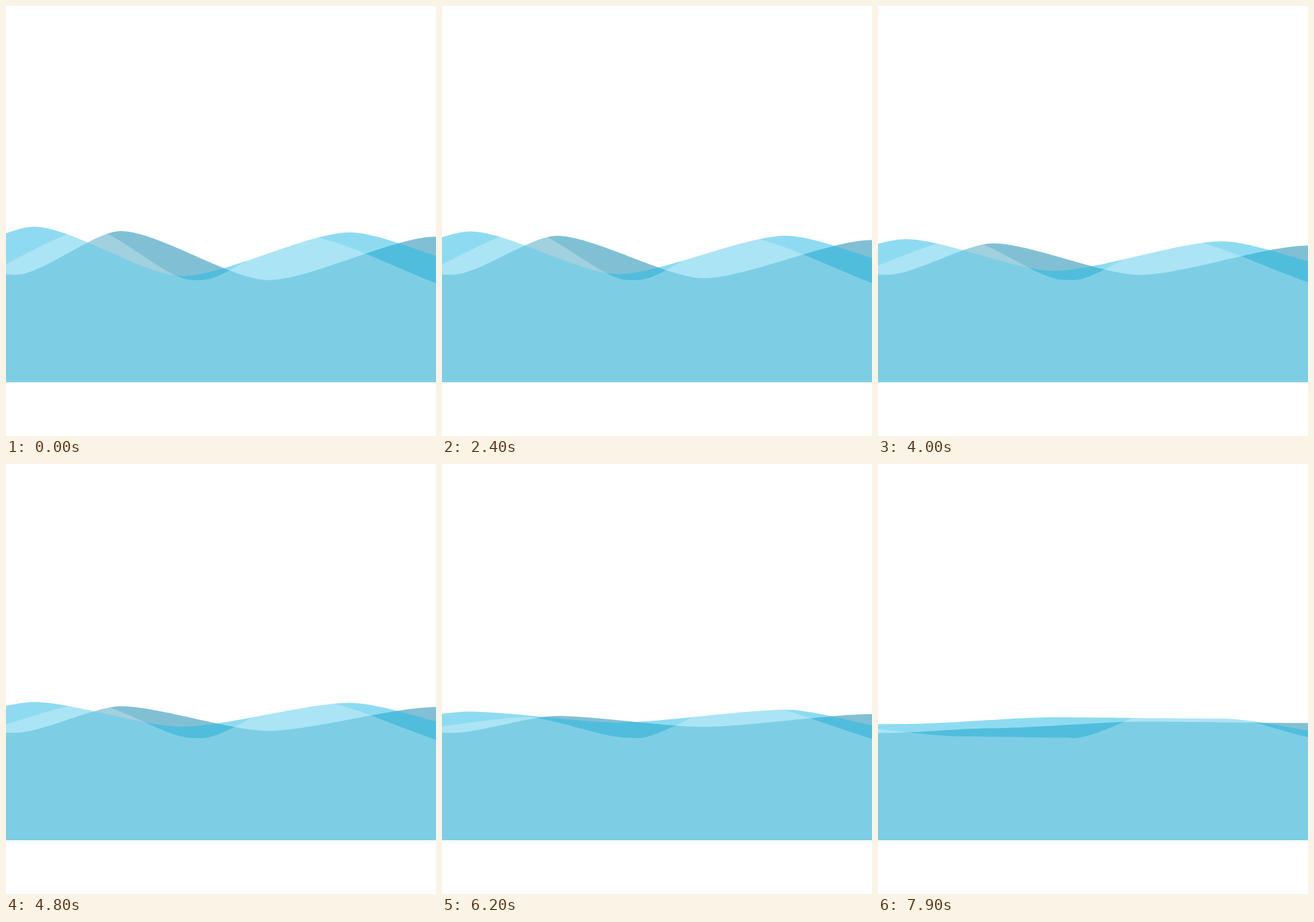
An HTML page that plays this animation: 640 px wide and 640 px high, repeating every 8 s.

```html
<!DOCTYPE html>
<html lang="en">
<head>
<meta charset="utf-8">
<title>Waves</title>
<style>
  html, body { margin: 0; width: 100%; height: 100%; overflow: hidden; background: #fff; }
  svg { display: block; width: 100%; height: 100%; }
</style>
</head>
<body>
<svg viewBox="0 0 640 640">
  <path id="back" fill="rgb(5,129,169)" fill-opacity=".5"/>
  <path id="middle" fill="rgb(40,187,229)" fill-opacity=".52"/>
  <path id="front" fill="#fff" fill-opacity=".25"/>
</svg>
<script>
const LOOP = 8000, STEP = 100, FLOOR = 560;
const TENSION = 0.25; // length of the level handles, as a share of the span

// Crests and troughs: x, first y, last y
const waves = [
  { id: 'back', delay: 0, rate: 0.000113, turns: [
    [-150, 380, 397], [15, 400, 400.3], [171, 335, 393.3], [390, 408, 383.5], [640, 343.3, 385.5]
  ] },
  { id: 'middle', delay: 0, rate: 0.000113, turns: [
    [-160, 402, 389], [42, 328.5, 387], [262, 402, 377], [512, 337, 379], [730, 394, 408]
  ] },
  { id: 'front', delay: 1400, rate: 0.00013, turns: [
    [-85, 415, 388], [126, 332.3, 405.5], [277, 408, 407.3], [291, 408, 408],
    [440, 342, 360], [715, 431, 419]
  ] }
];

function progress(time, { delay, rate }) {
  const swing = t => Math.sin(rate * Math.max(0, t - delay)) ** 2;
  return swing(time) / swing(LOOP - STEP);
}

function wavePath({ turns }, p) {
  const points = turns.map(([x, from, to]) => [x, from + (to - from) * p]);
  let [x, y] = points[0];
  let d = `M${x} ${FLOOR}V${y}`;
  for (const [nextX, nextY] of points.slice(1)) {
    const handle = TENSION * (nextX - x);
    d += `C${[x + handle, y, nextX - handle, nextY, nextX, nextY]}`;
    [x, y] = [nextX, nextY];
  }
  return `${d}V${FLOOR}Z`;
}

function draw(time) {
  for (const wave of waves) {
    document.getElementById(wave.id)
      .setAttribute('d', wavePath(wave, progress(time, wave)));
  }
}

const start = performance.now();
function tick(now) {
  const time = Math.max(0, now - start) % LOOP;
  draw(Math.floor(time / STEP) * STEP);
  requestAnimationFrame(tick);
}
draw(0);
requestAnimationFrame(tick);
</script>
</body>
</html>
```
